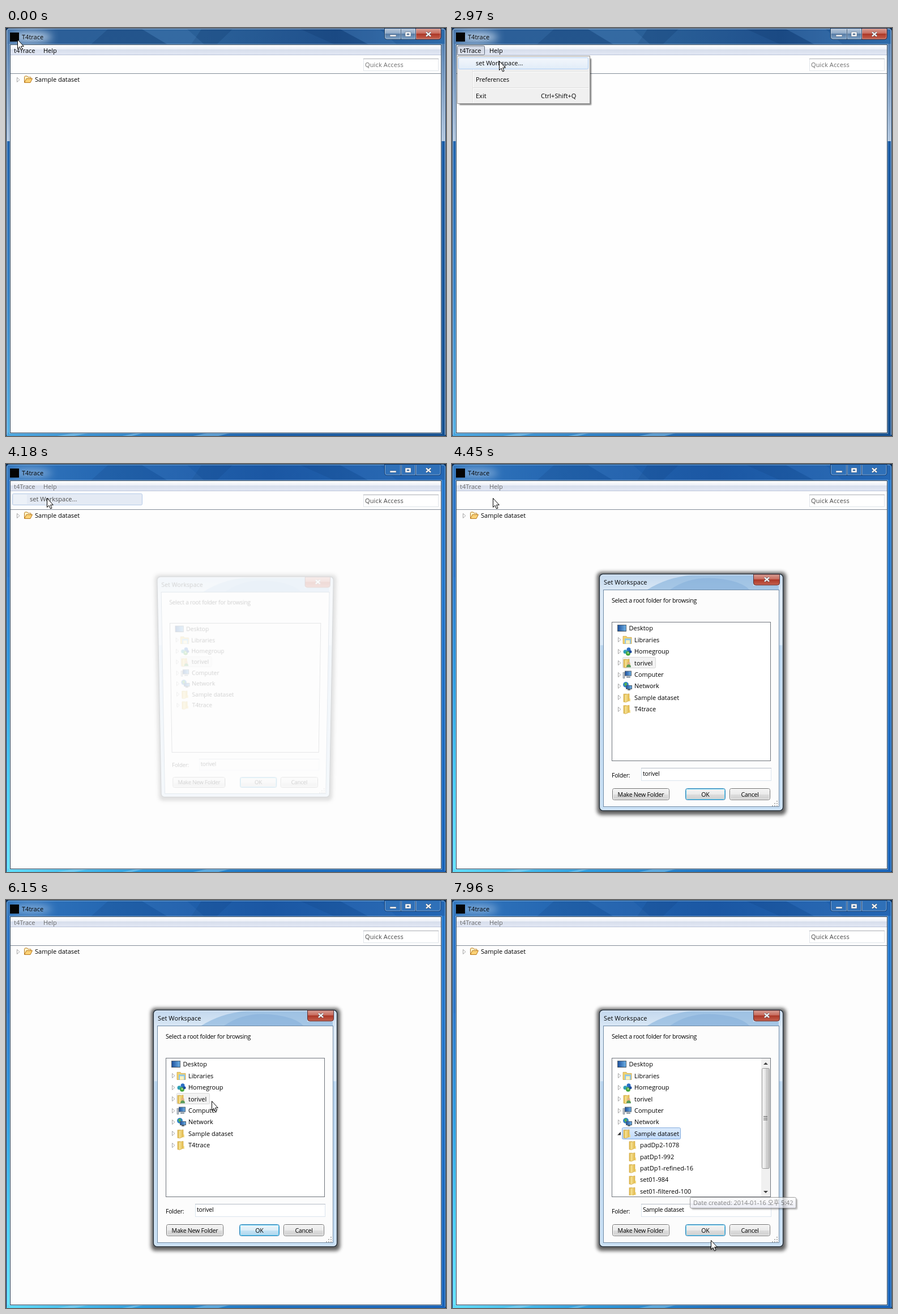
These frames come from a looping animation (777 by 721 pixels, 8 s). An HTML page:

```html
<!DOCTYPE html>
<html lang="en">
<head>
<meta charset="utf-8">
<title>Set Workspace</title>
<style>
html, body { margin: 0; width: 100%; height: 100%; overflow: hidden; background: #fefefe; }
svg { position: absolute; left: 0; top: 0; width: 100%; height: 100%; }
text { font: 11px "Open Sans", "Noto Sans", "Noto Sans CJK KR", "Noto Sans CJK", sans-serif; white-space: pre; }
.small { font-size: 10.6px; letter-spacing: -.25px; }
.mid { text-anchor: middle; }
#dialog { transform-origin: 54.63% 55.96%; }
</style>
</head>
<body>
<svg id="base" viewBox="0 0 777 721"></svg>
<svg id="dialog" viewBox="0 0 777 721"></svg>
<svg id="top" viewBox="0 0 777 721"></svg>
<script>
const $ = id => document.getElementById(id);
const rect = (x, y, w, h, fill, more = '') =>
  `<rect x="${x}" y="${y}" width="${w}" height="${h}" fill="${fill}" ${more}/>`;
const box = (x, y, w, h, fill, stroke, more = '') =>
  rect(x + .5, y + .5, w - 1, h - 1, fill, `stroke="${stroke}" ${more}`);
const path = (d, fill = 'none', more = '') => `<path d="${d}" fill="${fill}" ${more}/>`;
const text = (x, y, s, more = '') => `<text x="${x}" y="${y}" ${more}>${s}</text>`;
const group = (id, body, more = '') => `<g id="${id}" ${more}>${body}</g>`;
const at = (x, y, body) => `<g transform="translate(${x} ${y})">${body}</g>`;
const grad = (id, stops, flat) =>
  `<linearGradient id="${id}" x2="${flat ? 1 : 0}" y2="${flat ? 0 : 1}">` +
  stops.map(([o, c]) => `<stop offset="${o}" stop-color="${c}"/>`).join('') + '</linearGradient>';
const blur = (id, n) => `<filter id="${id}" x="-50%" y="-50%" width="200%" height="200%"><feGaussianBlur stdDeviation="${n}"/></filter>`;

const defs = '<defs>' +
  grad('barOn', [[0, '#4a78ac'], [.12, '#2c5f98'], [.45, '#2a6098'], [.75, '#1f508c'], [1, '#2f6cab']], 1) +
  grad('barOff', [[0, '#3276bd'], [.25, '#2466b1'], [.6, '#1b57a3'], [1, '#2467b4']], 1) +
  grad('paleSide', [[0, '#5681b2'], [1, '#b4c8df']]) +
  grad('leftOn', [[0, '#1f63ad'], [.5, '#3480c4'], [1, '#54b2e6']]) +
  grad('leftOff', [[0, '#2a78cc'], [.35, '#2d9de2'], [.7, '#46cff5'], [1, '#66e6fd']]) +
  grad('rightOn', [[0, '#1b5ca5'], [1, '#16508f']]) +
  grad('rightOff', [[0, '#2377cc'], [1, '#1762b8']]) +
  grad('footOn', [[0, '#4ba6de'], [.3, '#2e82c6'], [.6, '#1c5fa8'], [1, '#15508f']], 1) +
  grad('footOff', [[0, '#5ddcf8'], [.3, '#2c9bdc'], [.6, '#1c6fbd'], [1, '#1762b8']], 1) +
  grad('menuBar', [[0, '#ffffff'], [.42, '#eceff7'], [.45, '#d7deec'], [1, '#e3e8f5']]) +
  grad('glass', [[0, '#b9c9dc'], [.48, '#8ba6c4'], [.5, '#577ca5'], [1, '#7fa3c8']]) +
  grad('red', [[0, '#d9a096'], [.48, '#c66759'], [.5, '#ac3828'], [1, '#c5614e']]) +
  grad('itemFill', [[0, '#f3f7fc'], [1, '#e1ecf8']]) +
  grad('pressedFill', [[0, '#cfd5e1'], [1, '#dfe4ef']]) +
  grad('frameFill', [[0, '#c3d8ee'], [.08, '#dce9f6'], [.3, '#d9e8f7'], [.302, '#b9d5ef'], [1, '#c9e0f5']]) +
  grad('buttonFill', [[0, '#f4f4f4'], [.5, '#ebebeb'], [.52, '#dddddd'], [1, '#cfcfcf']]) +
  grad('hotFill', [[0, '#eaf6fd'], [.5, '#d9f0fc'], [.52, '#bee6fd'], [1, '#a7d9f5']]) +
  grad('chosenFill', [[0, '#dcebfc'], [1, '#c1dbfc']]) +
  grad('thumbFill', [[0, '#f5f5f5'], [.48, '#e6e6e6'], [.52, '#d2d2d2'], [1, '#c4c4c4']], 1) +
  grad('tipFill', [[0, '#ffffff'], [1, '#e4e5f0']]) +
  grad('folderFill', [[0, '#f9e9a0'], [1, '#e3b94b']], 1) +
  grad('screenFill', [[0, '#1c4f9c'], [1, '#6fb2e6']], 1) +
  blur('soft', 3) + blur('halo', 7) + blur('thin', 1.2) + '</defs>';

const minGlyph = rect(678, 12, 11, 3, '#fff', 'stroke="#4d5f77" stroke-width=".6"');
const maxGlyph = path('M705 7h10v8h-10zM708 10v2h4v-2z', '#fff', 'fill-rule="evenodd" stroke="#4d5f77" stroke-width=".6"');
const cross = (x, y) => path(`M${x - 4} ${y - 3.5}l8 7m0-7l-8 7`, 'none', 'stroke="#53606f" stroke-width="3.6"') +
  path(`M${x - 4} ${y - 3.5}l8 7m0-7l-8 7`, 'none', 'stroke="#fff" stroke-width="2.3"');

function windowFrame(on) {
  const k = on ? 'On' : 'Off', line = on ? '#c3d4e6' : '#7fb4e4';
  return rect(0, 0, 777, 721, '#0b2b52') +
    rect(1, 1, 775, 720, `url(#bar${k})`, 'rx="5"') +
    path('M180 2h60l45 27H150zM345 2h55l-28 27h-45zM520 2l60 27h60L590 2z', '#0d3568', `opacity="${on ? .25 : .14}"`) +
    path('M240 2h80l30 27h-65zM590 2h70l30 27h-50z', '#5b93c9', `opacity="${on ? .2 : .1}"`) +
    rect(1, 28, 6, 173, on ? 'url(#paleSide)' : '#2a74c6') + rect(769, 28, 7, 173, on ? 'url(#paleSide)' : '#2377cc') +
    rect(1, 200, 6, 521, `url(#left${k})`) + rect(769, 200, 7, 521, `url(#right${k})`) +
    rect(1, 715, 775, 6, `url(#foot${k})`) +
    path('M90 721l30-5h25l-25 5zM205 721l25-5h12l-20 5zM330 721l25-5h40l-20 5z', '#a7dcf5', 'opacity=".4"') +
    box(6, 28, 764, 689, 'none', '#cfe6fa', 'opacity=".5"') +
    path('M1.5 719V6q0-4.500 4.500-4.500H771q4.500 0 4.500 4.500V719', 'none', `stroke="${line}"`) +
    `<ellipse cx="45" cy="16" rx="36" ry="9" fill="#dce9f6" opacity="${on ? .75 : .42}" filter="url(#halo)"/>` +
    path('M668.500 1V16q0 4 4 4H764q4 0 4-4V1', on ? 'url(#glass)' : '#2f70b8', `stroke="${on ? '#24405f' : '#123c70'}"`) +
    (on ? path('M723.500 1V20H764q4 0 4-4V1', 'url(#red)', 'stroke="#4b2029"') : '') +
    path('M697.500 2v18M723.500 2v18', 'none', 'stroke="#24466e"') +
    path('M669.500 2v14q0 3 3 3h24V2m2 0v17h24V2m2 0v17H764q3 0 3-3V2', 'none', 'stroke="#fff" opacity=".38"') +
    minGlyph + maxGlyph + cross(746, 11) +
    rect(7, 29, 762, 687, '#2d4258') + rect(8, 30, 760, 18, 'url(#menuBar)') +
    rect(8, 47, 760, 1, '#b9c3d8') + rect(8, 48, 760, 32, '#fefefe') +
    rect(8, 81, 760, 634, on ? '#fefefe' : '#fdfdfd') + rect(8, 80, 760, 1, '#828c98') +
    box(631, 54, 133, 22, '#fff', '#e1e5ea') + rect(631, 54, 133, 1, '#abadb3') +
    text(634, 69, 'Quick Access', `fill="${on ? '#6b6b6b' : '#484848'}" letter-spacing=".15"`);
}

const expander = (x, y) => path(`M${x}.5 ${y - 4.5}v8l4.500-4z`, '#fff', 'stroke="#a5a5a5"');
const openFolder = path('M.5 11.500V2l1-1.500h4l1.500 2h5V5', '#fff3c8', 'stroke="#b9781b"') +
  path('M.5 12L4 5h10.500L11 12z', '#fbd277', 'stroke="#b9781b"');

const menuPanel = rect(13, 54, 233, 82, '#000', 'opacity=".5" filter="url(#thin)"') +
  box(9, 49, 235, 85, '#f0f0f0', '#979797') + path('M36.500 51v81', 'none', 'stroke="#e2e3e3"') +
  path('M37.500 51v81', 'none', 'stroke="#fff"') +
  path('M37 76.500H241M37 105.500H241', 'none', 'stroke="#dcdcdc"') +
  path('M37 77.500H241M37 106.500H241', 'none', 'stroke="#fff"') +
  text(42, 95, 'Preferences', 'style="font-size:10.7px"') + text(42, 124, 'Exit') + text(157, 124, 'Ctrl+Shift+Q');
const menuItem = id => box(11, 52, 230, 21, 'url(#itemFill)', '#aecff7', `id="${id}" rx="2"`);
const itemText = text(42, 66, 'set Workspace...');

$('base').innerHTML = defs + group('active', windowFrame(true)) + group('inactive', windowFrame(false)) +
  rect(7, 8, 16, 16, '#050505') + text(28, 19.500, 'T4trace') +
  box(9, 31, 49, 17, '#dce8f7', '#9cb5d8', 'id="hover" rx="2"') +
  box(9, 31, 49, 17, 'url(#pressedFill)', '#5e6879', 'id="press" rx="2"') +
  group('labels', text(14, 44, 't4Trace') + text(66, 44, 'Help')) +
  expander(19, 92) + at(32, 84.500, openFolder) + text(51, 94.500, 'Sample dataset') +
  group('menu', menuPanel + menuItem('lit') + itemText) +
  group('linger', box(11, 52, 230, 21, '#e4eaf4', '#b7cce8', 'rx="2"') + rect(13, 54, 24, 17, '#fff', 'opacity=".3"') + itemText,
    'fill="#4a4a4a"');

// 16px icons of the folder tree
const monitor = (x, y, w, h) => box(x, y, w, h, 'url(#screenFill)', '#50606f');
const folder = path('M1 1h5l1 1v12l-1 1H1z', '#e9c75f', 'stroke="#c99d35" stroke-width=".6"') +
  path('M3 2l8-1.500V13l-6 2.500H3z', 'url(#folderFill)', 'stroke="#cfa43d" stroke-width=".6"') +
  rect(11, 9, 2, 5, '#f4dd86');
const ball = (x, y, r, c) => `<circle cx="${x}" cy="${y}" r="${r}" fill="${c}"/>`;
const icons = {
  Desktop: monitor(0, 1, 16, 12) + rect(1, 12, 14, 1, '#3c4a58'),
  Libraries: path('M0 3V1h6l1 2h8v11H0z', '#f1d26d', 'stroke="#c59a3a" stroke-width=".7"') +
    rect(3, 5, 11, 9, '#8cc6ec') + rect(5, 8, 7, 6, '#fff2bd'),
  Homegroup: ball(10, 4, 3.500, '#2b6fc4') + ball(4, 8, 3.500, '#2f9fb4') + ball(9, 11, 4, '#46a63c') + ball(13, 8, 2.500, '#1d4b9a') + ball(9, 10, 1.500, '#b5e3a1'),
  user: folder + ball(10, 8, 2.500, '#e0b184') + path('M6 15q0-5 4-5t4 5z', '#5a9a5b'),
  Computer: rect(0, 4, 3, 10, '#bcc4cc', 'stroke="#66717c" stroke-width=".6"') + monitor(3, 1, 12, 9) + rect(6, 11, 7, 2, '#7d8994'),
  Network: ball(5, 5, 5, '#2d83c9') + path('M2 3l4-2 1 3-3 4z', '#53b24c') + monitor(5, 6, 11, 7) + rect(8, 13, 5, 2, '#65727f'),
};
const rowY = i => 290 + i * 20.4;
const rows = ['Desktop', 'Libraries', 'Homegroup', 'torivel', 'Computer', 'Network', 'Sample dataset', 'T4trace'];
const row = (name, i) => at(i ? 302 : 292, rowY(i) - 7, icons[name] || (name === 'torivel' ? icons.user : folder)) +
  text(i ? 322 : 312.500, rowY(i) + 4.300, name);
const subs = ['padDp2-1078', 'patDp1-992', 'patDp1-refined-16', 'set01-984', 'set01-filtered-100'];
const subRow = (name, i) => at(312, rowY(i + 7) - 7, folder) + text(332, rowY(i + 7) + 4.300, name);
const button = (x, w, label, rim = '#707070') => box(x, 573, w, 21, 'url(#buttonFill)', rim, 'rx="3"') +
  box(x + 1, 574, w - 2, 19, 'none', rim === '#707070' ? '#fbfbfb' : '#5fd0f3', 'rx="2"') +
  (rim === '#707070' ? '' : box(x + 1, 574, w - 2, 19, 'url(#hotFill)', '#48c6f2', 'id="pulse" rx="2"')) +
  text(x + w / 2, 587.500, label, 'class="small mid"');
const scrollBar = rect(546, 280, 16, 244, '#f0f0f0') + path('M550 291l4-4 4 4zM550 514l4 4 4-4z', '#404040') +
  box(547, 297, 14, 178, 'url(#thumbFill)', '#979797', 'rx="2"') +
  path('M550 382.500h7m-7 3h7m-7 3h7', 'none', 'stroke="#555"');
const grip = [[8, 0], [4, 4], [8, 4], [0, 8], [4, 8], [8, 8]].map(([x, y]) => rect(565 + x, 595 + y, 2, 2, '#b4b4b4')).join('');

$('dialog').innerHTML = rect(256, 191, 334, 429, '#000', 'rx="8" opacity=".62" filter="url(#soft)"') +
  box(260, 194, 325, 419, 'url(#frameFill)', '#27333f', 'rx="6" stroke-width="1.500"') +
  path('M345 222Q380 200 425 196H532V215H577V222z', '#86b2dd', 'opacity=".6"') +
  path('M385 222q35-24 80-20t60 20z', '#6c9dd0', 'opacity=".3"') +
  box(261.5, 195.500, 322, 416, 'none', '#f1f7fd', 'rx="5" opacity=".8"') +
  path('M532.500 195v15q0 4 4 4h38q4 0 4-4v-15z', 'url(#red)', 'stroke="#5b2f33"') + cross(556, 204) +
  text(268, 213, 'Set Workspace', 'letter-spacing=".1"') +
  box(267, 222, 311, 384, '#fcfcfc', '#6f8aa5') +
  text(282, 245, 'Select a root folder for browsing', 'class="small"') +
  box(282, 279, 281, 246, '#fff', '#6f747b') +
  box(301, 341, 59, 20, '#f3f3f3', '#d9d9d9', 'id="home" rx="2"') +
  box(300, 402, 104, 21, 'url(#chosenFill)', '#84acdd', 'id="chosen" rx="2"') +
  rows.slice(0, 7).map(row).join('') +
  [1, 2, 3, 4, 5].map(i => expander(293, Math.round(rowY(i)) + 1)).join('') +
  group('shut', expander(293, 413) + expander(293, 434) + row('T4trace', 7)) +
  group('open', path('M292 415.500h6v-6z', '#333') + subs.map(subRow).join('') + rect(283, 522, 263, 2, '#fff') + scrollBar) +
  text(282, 553.500, 'Folder:', 'class="small"') + box(334, 537, 230, 23, '#fff', '#dbe5ee') + rect(334, 537, 230, 1, '#b5bcc6') +
  text(337, 551, '', 'id="folderName" class="small"') +
  button(283, 101, 'Make New Folder') + button(412, 71, 'OK', '#3c7fb1') + button(490, 72, 'Cancel') + grip;

const tip = (id, x, y, s) => group(id, rect(x + 3, y + 3, 187, 19, '#000', 'rx="2" opacity=".4" filter="url(#thin)"') +
  box(x, y, 188, 20, 'url(#tipFill)', '#767676', 'rx="2"') + text(x + 6, y + 13.500, s, 'fill="#575757"'));
const ink = 'stroke="#000" stroke-linejoin="round"';
$('top').innerHTML = tip('tipA', 369, 437, 'Date created: 2014-01-16 오후 5:41') +
  tip('tipB', 420, 525, 'Date created: 2014-01-16 오후 5:42') +
  group('cursor', path('M.5.5V16.500L4 13.200 6.500 19 9 18 6.600 12.300H11.300z', '#fff', `id="arrow" ${ink}`) +
    path('M-1.500 11V1.500Q-1.500 0 0 0T1.500 1.500V7Q3 5.500 4.300 7.300 6 6 7 8 9 7.300 9.200 9.500V13Q9 16 7.500 18V20H-.5V18Q-3 15.500-5.500 11.500-5 9-3 10.300zM1.500 7v4M4.300 7.500V11M7 8.200V11', '#fff', `id="hand" ${ink}`));

// [time, x, y, hand]
const moves = [[0, 20, 20], [130, 23, 27], [260, 28, 36], [390, 33, 45], [520, 34, 47], [970, 36, 40],
  [1890, 46, 50], [2010, 53, 57], [2970, 83, 58], [3100, 81, 62], [3230, 78, 66], [3360, 75, 65], [3500, 73, 63], [3630, 72, 60],
  [4890, 85, 68], [5030, 180, 109], [5160, 290, 170], [5300, 352, 223], [5440, 365, 285], [5580, 370, 325], [5710, 367, 343],
  [5850, 365, 350], [6000, 364, 354], [6150, 363, 355], [6290, 361, 382, 1], [6430, 360, 408, 1], [6580, 360, 421, 1],
  [7150, 368, 445, 1], [7290, 390, 483, 1], [7420, 408, 512, 1], [7690, 426, 545], [7830, 448, 588], [7960, 457, 601]];
const menuFade = [[0, 0], [970, .3], [1090, .6], [1210, .85], [1330, 1], [4040, 0]];
const dialogFade = [[0, 0], [4180, .18], [4310, .6], [4450, 1]];
const tilt = [[0, 1], [4310, .5], [4450, 0]];
const tipAFade = [[0, 0], [6860, .5], [7010, 1], [7150, 0]];
const tipBFade = [[0, 0], [7420, .5], [7560, 1], [7830, .85], [7960, .7]];
const held = (keys, t) => keys.findLast(k => k[0] <= t);
const level = (keys, t) => held(keys, t)[1];
const fade = (id, v) => { $(id).style.opacity = v; };
const show = (id, v) => { $(id).style.display = v ? '' : 'none'; };

function draw(t) {
  const [, x, y, hand] = held(moves, t);
  $('cursor').setAttribute('transform', `translate(${x} ${y})`);
  show('hand', hand);
  show('arrow', !hand);

  const away = t >= 4180, opened = t >= 6720;
  show('active', !away);
  show('inactive', away);
  $('labels').setAttribute('fill', away ? '#6d6d6d' : '#000');
  show('hover', t >= 390 && t < 970);
  show('press', t >= 970 && t < 4040);
  fade('menu', level(menuFade, t));
  show('lit', t >= 2010);
  show('linger', t >= 4040 && t < 4310);

  const lean = level(tilt, t);
  fade('dialog', level(dialogFade, t));
  $('dialog').style.transform = lean
    ? `translateY(${-5 * lean}px) perspective(1000px) translateZ(${-66 * lean}px) rotateX(${-7 * lean}deg)` : 'none';
  show('home', t < 6580);
  show('chosen', t >= 6580);
  show('shut', !opened);
  show('open', opened);
  $('folderName').textContent = t < 6580 ? 'torivel' : 'Sample dataset';
  const beat = (t - 5000) / 1600;
  fade('pulse', beat > 0 && beat < 1 ? Math.sin(Math.PI * beat) : 0);

  fade('tipA', level(tipAFade, t));
  fade('tipB', level(tipBFade, t));
}

const start = performance.now();
function tick() {
  draw((performance.now() - start) % 8000);
  requestAnimationFrame(tick);
}
tick();
</script>
</body>
</html>
```
